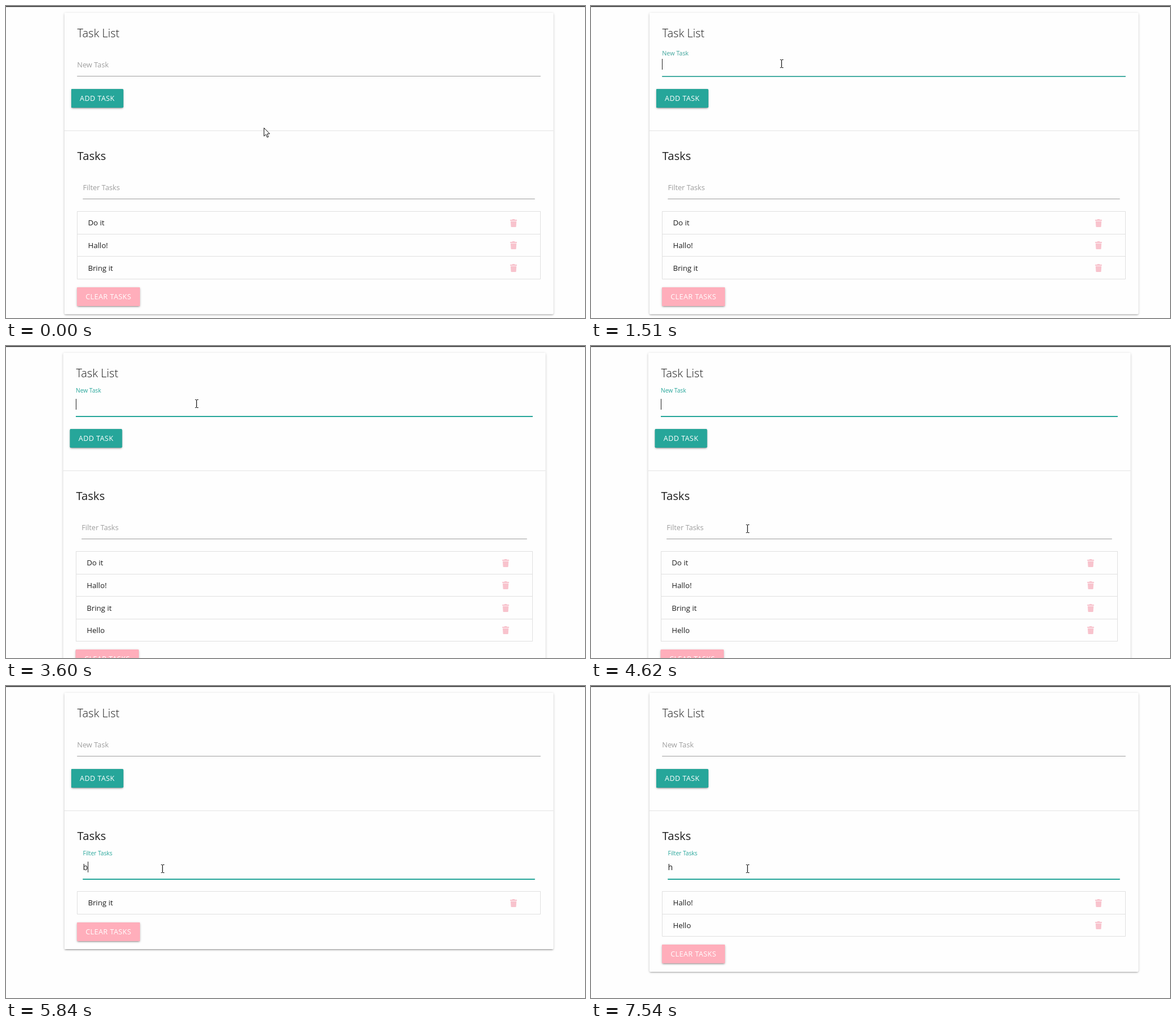
An HTML page with a canvas that plays this animation: 1020 by 549 pixels, repeating every 8 s.

```html
<!DOCTYPE html>
<html lang="en">
<head>
<meta charset="utf-8">
<title>Task List</title>
<style>
html, body { margin: 0; width: 100%; height: 100%; overflow: hidden; background: #fefefe; }
canvas { display: block; width: 1020px; height: 549px; }
</style>
</head>
<body>
<canvas id="stage" width="1020" height="549"></canvas>
<script>
const ctx = document.getElementById('stage').getContext('2d');
const LOOP = 8000;
const ROW = 39.6, LIST_TOP = 361.5;
const PAPER = '#fefefe', INK = '#1f1f1f', MUTED = '#9e9e9e', TEAL = '#26a69a';
const PINK = '#ffaebb', PALE_PINK = '#f8c3cd', BORDER = '#e0e0e0';

// Keyframes: [time, value], each held until the next one.
const draftKeys = [[0, ''], [1860, 'H'], [2070, 'He'], [2230, 'Hel'], [2350, 'Hell'], [2560, 'Hello'], [2830, '']];
const queryKeys = [[0, ''], [5630, 'b'], [5890, 'br'], [6640, 'b'], [6790, ''], [7010, 'h']];
const filterKeys = [[0, ''], [5730, 'b'], [6850, ''], [7090, 'h']];
const caretKeys = [[0, false], [1400, true], [3070, false], [3600, true], [4130, false], [4600, true],
  [5130, false], [5200, true], [6400, false], [6790, true], [7540, false]];

const FOCUS_DRAFT = 1400, FOCUS_QUERY = 5190;

// Pointer moves: time span, number of steps, and a quadratic curve.
const moves = [
  { start: 520, end: 1130, steps: 20, from: [454, 214], via: [385, 55], to: [336, 101.5] },
  { start: 4030, end: 4300, steps: 10, from: [336, 101.5], via: [322, 200], to: [288, 293] },
  { start: 4520, end: 4620, steps: 5, from: [288, 293], via: [281, 310], to: [276, 321.5] }
];

const clamp = v => Math.max(0, Math.min(1, v));
const mix = (a, b, p) => a + (b - a) * p;
const smooth = p => p * p * (3 - 2 * p);
const easeOut = (t, start) => 1 - (1 - clamp((t - start) / 200)) ** 2;
const held = (keys, t) => keys.reduce((value, key) => t >= key[0] ? key[1] : value, keys[0][1]);

function box(x, y, w, h, color) {
  ctx.fillStyle = color;
  ctx.fillRect(x, y, w, h);
}

function text(str, x, y, size, color, weight = 400) {
  ctx.font = `${weight} ${size}px "Open Sans", "Noto Sans", sans-serif`;
  ctx.fillStyle = color;
  ctx.fillText(str, x, y);
}

// Raised surface: three stacked shadows under a rounded rectangle.
function raised(x, y, w, h, color) {
  const shadows = [[1.8, 1.8, 0, 0.14], [2.7, 0.9, 1.8, 0.12], [0.9, 4.5, 0, 0.2]];
  ctx.fillStyle = color;
  for (const [dy, blur, inset, alpha] of shadows) {
    ctx.save();
    ctx.shadowColor = `rgba(0,0,0,${alpha})`;
    ctx.shadowOffsetY = dy;
    ctx.shadowBlur = blur;
    ctx.beginPath();
    ctx.roundRect(x + inset, y + inset, w - 2 * inset, h - 2 * inset, 1.8);
    ctx.fill();
    ctx.restore();
  }
  ctx.beginPath();
  ctx.roundRect(x, y, w, h, 1.8);
  ctx.fill();
}

function button(label, x, y, w, color) {
  raised(x, y, w, 33, color);
  ctx.save();
  ctx.textAlign = 'center';
  ctx.letterSpacing = '0.45px';
  text(label, x + w / 2, y + 21, 12.5, '#fff');
  ctx.restore();
}

function field({ label, value, left, right, base, focus, caret }) {
  const lift = value ? 1 : focus;
  box(left, base + 15, right - left, 1, MUTED);
  ctx.globalAlpha = focus;
  box(left, base + 15, right - left, 2, TEAL);
  ctx.globalAlpha = 1;

  const y = base - 26 * lift, size = mix(12.75, 10.2, lift);
  const x = left + 0.1;
  const tint = [[158, 38], [158, 166], [158, 154]].map(([a, b]) => Math.round(mix(a, b, focus)));
  text(label, x, y, size, `rgb(${tint})`);

  text(value, x, base, 14.1, INK);
  if (caret) box(Math.floor(x + 0.1 + ctx.measureText(value).width), base - 15, 1, 19, '#222');
}

function trash(x, y) {
  ctx.fillStyle = PALE_PINK;
  ctx.beginPath();
  ctx.roundRect(x - 6, y - 6, 12, 2, 0.6);
  ctx.roundRect(x - 2.3, y - 7, 4.6, 1.6, 0.6);
  ctx.moveTo(x - 5.2, y - 3.3);
  ctx.lineTo(x + 5.2, y - 3.3);
  ctx.lineTo(x + 4.6, y + 6);
  ctx.quadraticCurveTo(x + 4.5, y + 7, x + 3.5, y + 7);
  ctx.lineTo(x - 3.5, y + 7);
  ctx.quadraticCurveTo(x - 4.5, y + 7, x - 4.6, y + 6);
  ctx.fill();
}

function list(items, left, right) {
  const edge = i => Math.floor(LIST_TOP + ROW * i);
  const bottom = edge(items.length);
  items.forEach((item, i) => {
    text(item, left + 19.2, Math.round(386.4 + ROW * i), 13.2, INK);
    trash(right - 47.7, Math.round(381.6 + ROW * i));
    box(left, edge(i), right - left, 1, BORDER);
  });
  box(left, bottom, right - left, 1, BORDER);
  box(Math.round(left), LIST_TOP, 1, bottom - LIST_TOP, BORDER);
  box(Math.round(right) - 1, LIST_TOP, 1, bottom - LIST_TOP, BORDER);
}

function pointerAt(t) {
  const move = moves.filter(m => t >= m.start).pop();
  if (!move) return moves[0].from;
  const { start, end, steps, from, via, to } = move;
  const step = Math.floor((t - start) / (end - start) * (steps - 1) + 1e-6) + 1;
  const p = smooth(clamp(step / steps)), q = 1 - p;
  return from.map((a, i) => q * q * a + 2 * p * q * via[i] + p * p * to[i]);
}

function pointer([x, y]) {
  const overField = (y > 84 && y < 124) || (y > 300 && y < 340);
  x = Math.round(x);
  y = Math.floor(y);
  ctx.save();
  ctx.translate(x, y);
  if (overField) {
    box(-1, -6, 1.3, 13, '#222');
    for (const edge of [-7, 7]) {
      box(-3, edge, 2.3, 1, '#222');
      box(0, edge, 3, 1, '#222');
    }
  } else {
    ctx.translate(0.5, 0.5);
    ctx.beginPath();
    [[0, 0], [0, 14.5], [3.3, 11.4], [5.6, 16.6], [7.8, 15.7], [5.5, 10.6], [10, 10.3]]
      .forEach(([px, py]) => ctx.lineTo(px, py));
    ctx.closePath();
    ctx.fillStyle = '#fff';
    ctx.fill();
    ctx.strokeStyle = '#111';
    ctx.lineWidth = 1;
    ctx.stroke();
  }
  ctx.restore();
}

function draw(t) {
  const filter = held(filterKeys, t);
  const tasks = ['Do it', 'Hallo!', 'Bring it'];
  if (t >= 2830) tasks.push('Hello');
  const items = tasks.filter(task => task.toLowerCase().includes(filter));

  // A long list brings in the scrollbar, which narrows the page.
  const scrolls = items.length > 3;
  const shiftLeft = scrolls ? -2.2 : 0, shiftRight = scrolls ? -13.9 : 0;
  const left = 125.2 + shiftLeft, right = 941.8 + shiftRight;
  const cardLeft = 103 + shiftLeft, cardRight = 964.3 + shiftRight;
  const listBottom = LIST_TOP + ROW * items.length;

  box(0, 0, 1020, 549, PAPER);
  box(0, 0, 1020, 1.6, '#333');
  raised(cardLeft, 12, cardRight - cardLeft, listBottom + 50, PAPER);
  box(cardLeft, 219, cardRight - cardLeft, 1, '#e4e4e4');

  text('Task List', left + 0.4, 55, 20, INK, 300);
  text('Tasks', left + 0.4, 271, 20.2, INK);

  const queryFocus = easeOut(t, FOCUS_QUERY);
  const caret = held(caretKeys, t), onQuery = t >= FOCUS_QUERY;
  field({
    label: 'New Task', value: held(draftKeys, t), left, right, base: 108,
    focus: easeOut(t, FOCUS_DRAFT) * (1 - queryFocus), caret: caret && !onQuery
  });
  field({
    label: 'Filter Tasks', value: held(queryKeys, t), left: left + 10.1, right: right - 10.1, base: 324,
    focus: queryFocus, caret: caret && onQuery
  });

  button('ADD TASK', 115 + shiftLeft, 146, 91.5, TEAL);
  list(items, left, right);
  button('CLEAR TASKS', left - 0.2, Math.round(listBottom + 14.5), 111, PINK);
  pointer(pointerAt(t));
}

const began = performance.now();
function tick() {
  draw((performance.now() - began) % LOOP);
  requestAnimationFrame(tick);
}
tick();
</script>
</body>
</html>
```
